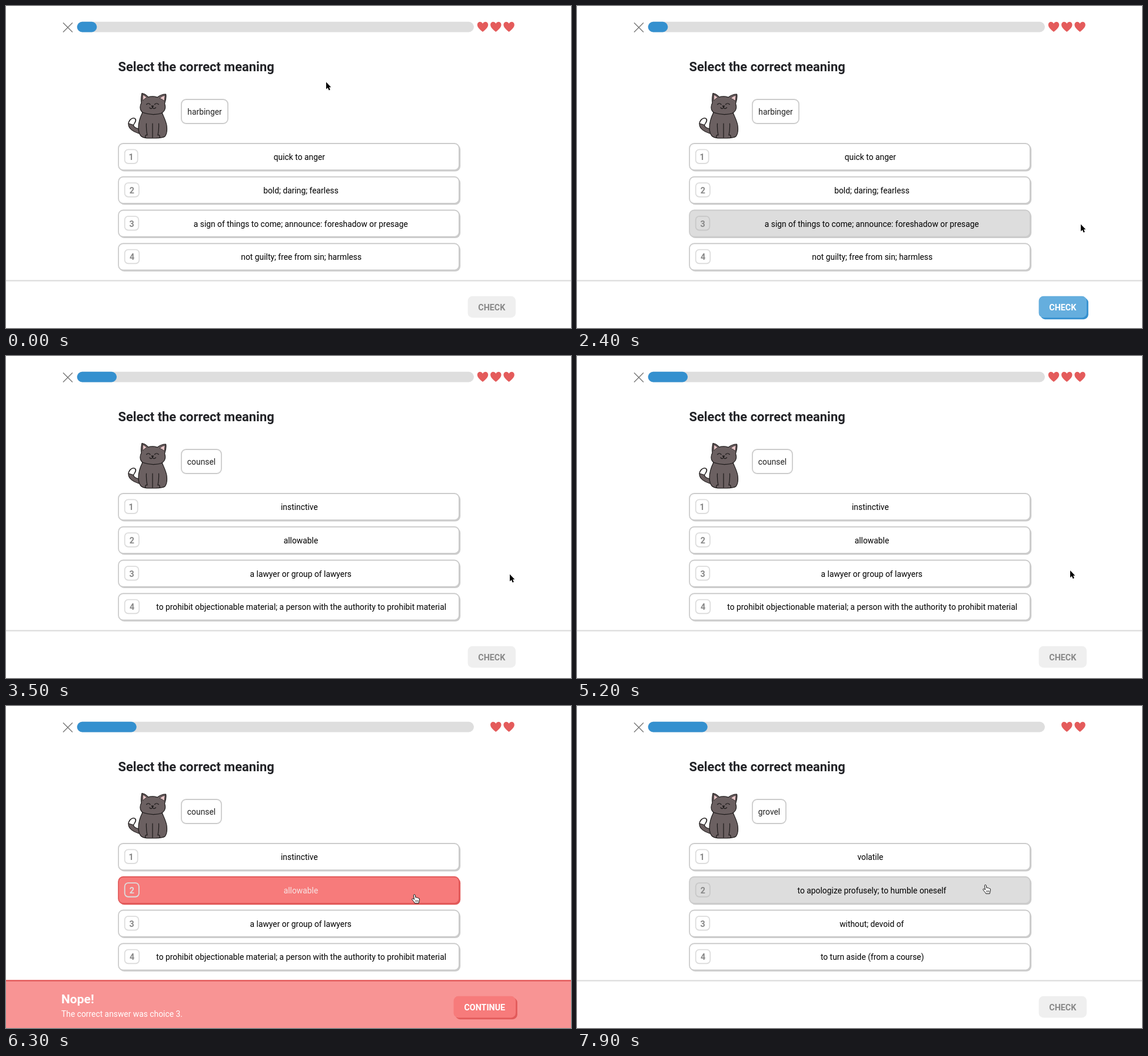
These frames come from a looping animation (960 by 548 pixels, 8000 ms). An HTML page:

```html
<!DOCTYPE html>
<html lang="en">
<head>
<meta charset="utf-8">
<title>Vocabulary quiz</title>
<style>
  html, body { margin: 0; width: 100%; height: 100%; overflow: hidden; background: #fff; }
  svg { display: block; width: 960px; height: 548px; }
  text { font: 400 13.85px Roboto, sans-serif; fill: #000; }
  .mid { text-anchor: middle; }
  .title { font-size: 21.9px; font-weight: 700; fill: #222327; }
  .result { font-size: 21px; font-weight: 700; fill: #fff; }
  .bold { font-size: 14.3px; font-weight: 700; }
  .cat { fill: #6b6061; stroke: #1d1a1a; stroke-width: 1.2; stroke-linejoin: round; stroke-linecap: round; }
  .cat .line { fill: none; }
  .cat .ear { fill: #e6c4c6; stroke-width: .7; }
  .cat .tip { fill: #fff; }
</style>
</head>
<body>
<svg id="stage" viewBox="0 0 960 548"></svg>
<script>
const DURATION = 8000;
const stage = document.getElementById('stage');

const QUESTIONS = [
  { word: 'harbinger', width: 79, choices: ['quick to anger', 'bold; daring; fearless',
    'a sign of things to come; announce: foreshadow or presage', 'not guilty; free from sin; harmless'] },
  { word: 'counsel', width: 68, choices: ['instinctive', 'allowable', 'a lawyer or group of lawyers',
    'to prohibit objectionable material; a person with the authority to prohibit material'] },
  { word: 'grovel', width: 57, choices: ['volatile', 'to apologize profusely; to humble oneself',
    'without; devoid of', 'to turn aside (from a course)'] },
];

const THEMES = {
  plain: { fill: '#fff', edge: '#ccc', text: '#000', badge: '#ddd', digit: '#888' },
  grey: { fill: '#ddd', edge: '#ccc', text: '#000', badge: '#c8c8c8', digit: '#888' },
  right: { fill: '#65aede', edge: '#3490cf', text: '#eef2f4', badge: '#ddd', digit: '#ddd', bar: '#65aede' },
  wrong: { fill: '#f77b7b', edge: '#e25a5a', text: '#f6e4e4', badge: '#ddd', digit: '#ddd', bar: '#f89494' },
};

const RESULTS = {
  right: ['Woohoo!', 'Nubo is pleased.'],
  wrong: ['Nope!', 'The correct answer was choice 3.'],
};

// Each step changes part of the state; pick is the highlighted choice.
const STEPS = [
  [0, { question: 0, progress: 1, hearts: 3, pick: -1, ready: false, result: '', x: 544, y: 129.5 }],
  [500, { x: 547, y: 186 }],
  [600, { x: 554, y: 306, pick: 1 }],
  [700, { x: 561, y: 392, pick: 2 }],
  [800, { x: 561, y: 367 }],
  [1000, { y: 365, ready: true }],
  [2100, { x: 592, y: 360 }],
  [2200, { x: 705, y: 354 }],
  [2300, { x: 826, y: 366 }],
  [2400, { x: 856, y: 371.5 }],
  [2800, { progress: 2, result: 'right' }],
  [3500, { question: 1, pick: -1, ready: false, result: '' }],
  [5200, { x: 838, y: 365 }],
  [5300, { x: 778, y: 344 }],
  [5400, { x: 720, y: 328, pick: 1 }],
  [5500, { x: 697, y: 322 }],
  [5600, { x: 694, y: 321, ready: true }],
  [6200, { progress: 3, hearts: 2, result: 'wrong' }],
  [7200, { question: 2, ready: false, result: '' }],
  [7900, { y: 304.5 }],
];

const BADGE_WIDTHS = [22, 24.2, 23.6, 24.6];
const CHOICE_CENTERS = [498.4, 501, 500.8, 501.7];

const rect = (x, y, w, h, r, fill, extra = '') =>
  `<rect x="${x}" y="${y}" width="${w}" height="${h}" rx="${r}" fill="${fill}" ${extra}/>`;
const outline = (color, width) => `stroke="${color}" stroke-width="${width}"`;
const label = (x, y, text, kind = '', color = '') =>
  `<text x="${x}" y="${y}" class="${kind}" ${color && `style="fill:${color}"`}>${text}</text>`;
const path = (d, attrs) => `<path d="${d}" ${attrs}/>`;

function header({ progress, hearts }) {
  const heart = 'M0 8.3C-4 5-9.2 1-9.2-3.7C-9.2-9.6-2-10.6 0-5.6C2-10.6 9.2-9.6 9.2-3.7C9.2 1 4 5 0 8.3Z';
  let out = path('M97 28.5L113 44.5M113 28.5L97 44.5', outline('#777', 1.4));
  out += rect(120.7, 26.8, 674.3, 17.6, 8.8, '#dedede');
  out += rect(120.7, 26.8, progress * 33.7, 17.6, 8.8, '#3490cf');
  for (let i = 0; i < hearts; i++)
    out += path(heart, `fill="#e45b5b" transform="translate(${854.6 - i * 22.3} 35.7)"`);
  return out;
}

const CAT = '<g class="cat">' +
  path('M230 218C217 215 208 209 208 201C208 195 213 190 218 191C223 193 220 198 217 201C215 206 222 209 231 210Z', '') +
  path('M208.2 200C209 195 213 190 218 191C222 193 220 197 216.5 202.5Z', 'class="tip"') +
  path('M232 181C228 189 225 198 225 207C225 214 227 219 230 222C234 225 240 225 249 225C258 225 266 225 270 222C274 217 274 210 273 203C271 193 267 187 265 181Z', '') +
  path('M230 165C229 158 230 153 231 148.5C235 149 239 152 241.5 155C246 153.5 253 153.5 257 155.5C261 152 266 150 271.5 150C273 156 271 161 269.5 166C272 173 270 179 264 182.5Q249 187 233 181.5C227 178 227 170 230 165Z', '') +
  path('M232.8 151L239.5 155.5Q235 157.5 232.5 161Z', 'class="ear"') +
  path('M270 152Q265 153 261 157Q266 158.5 268.7 161.5Z', 'class="ear"') +
  path('M238.7 167.5Q241.8 164 245 167.5M252.5 167.5Q256 164 259.3 167.5M244 173Q247 176.5 249 172.5Q251 176.5 254.5 173', 'class="line"') +
  path('M247.3 170H250.7L249 172.2Z', 'style="fill:#1d1a1a"') +
  path('M238.5 200Q238 211 240 220M249 200V224M259.5 200Q260 211 258 220M237 224Q236 219 240 219.5M261 224Q262 219 258 219.5', 'class="line"') +
  '</g>';

function card(text, i, theme) {
  const y = 234 + i * 56.75;
  const badge = BADGE_WIDTHS[i];
  return rect(192.2, y + 1.4, 580, 46.2, 9, theme.edge) +
    rect(191.1, y, 578.8, 45.2, 8, theme.fill, outline(theme.edge, 1.8)) +
    rect(201.7, y + 10.4, badge, 23.6, 6, 'none', outline(theme.badge, 1.8)) +
    label(201.7 + badge / 2, y + 28, i + 1, 'bold mid', theme.digit) +
    label(CHOICE_CENTERS[i], y + 28, text, 'mid', theme.text);
}

function button(x, text, fill, shadow, color) {
  const width = 866 - x;
  return (shadow ? rect(x + 2.8, 496.6, width, 36.6, 8, shadow) : '') +
    rect(x, 493.8, width, 36.6, 8, fill) +
    label(x + width / 2, 518.2, text, 'bold mid', color);
}

function footer({ result, ready }) {
  if (!result) {
    return rect(0, 466.3, 960, 2.3, 0, '#ddd') + (ready
      ? button(784.6, 'CHECK', '#65aede', '#3490cf', '#fff')
      : button(784.6, 'CHECK', '#efefef', '', '#888'));
  }
  const { fill, edge, bar } = THEMES[result];
  const [title, note] = RESULTS[result];
  return rect(0, 466.3, 960, 82, 0, bar) + rect(0, 466.3, 960, 2.3, 0, edge) +
    label(94, 505.5, title, 'result') + label(94, 528.6, note, '', '#fff') +
    button(760.6, 'CONTINUE', fill, edge, '#fff');
}

function cursor({ x, y }) {
  const overCard = x < 770 && y > 233;
  const shape = overCard
    ? path('M-1.5 1.2C-1.5-.6 1.1-.6 1.3 1.2L2 5Q3.6 4 4.3 5.4Q5.8 4.7 6.5 6Q8.5 5.8 8.6 8C8.6 10.5 7.7 12 7.2 14.8H.8C-.5 12-2.8 10.6-4 8.2C-4.4 6.6-2.8 6-1.7 7.2L-.4 8.5Z',
        `fill="#fff" ${outline('#111', 1)}`) +
      path('M2 9.2V12.6M4 9.2V12.6M6 9.2V12.6', outline('#222', .8))
    : path('M0 0V12L2.8 9.5L4.7 14L6.8 13L5 8.8H8.3Z',
        `fill="#000" ${outline('#fff', 1.6)} paint-order="stroke"`);
  return `<g transform="translate(${x} ${y})">${shape}</g>`;
}

function draw(state) {
  const { word, width, choices } = QUESTIONS[state.question];
  const cards = choices.map((text, i) =>
    card(text, i, THEMES[i === state.pick ? state.result || 'grey' : 'plain']));
  return header(state) + label(190.5, 111, 'Select the correct meaning', 'title') + CAT +
    rect(298, 159, width, 41, 8, '#fff', outline('#ccc', 1.8)) +
    label(298 + width / 2, 185.4, word, 'mid', '#222') +
    cards.join('') + footer(state) + cursor(state);
}

const start = performance.now();
let shown = -1;

function tick() {
  const time = (performance.now() - start) % DURATION;
  const passed = STEPS.filter(([at]) => at <= time);
  if (passed.length !== shown) {
    shown = passed.length;
    stage.innerHTML = draw(Object.assign({}, ...passed.map(([, change]) => change)));
  }
  requestAnimationFrame(tick);
}
tick();
</script>
</body>
</html>
```
